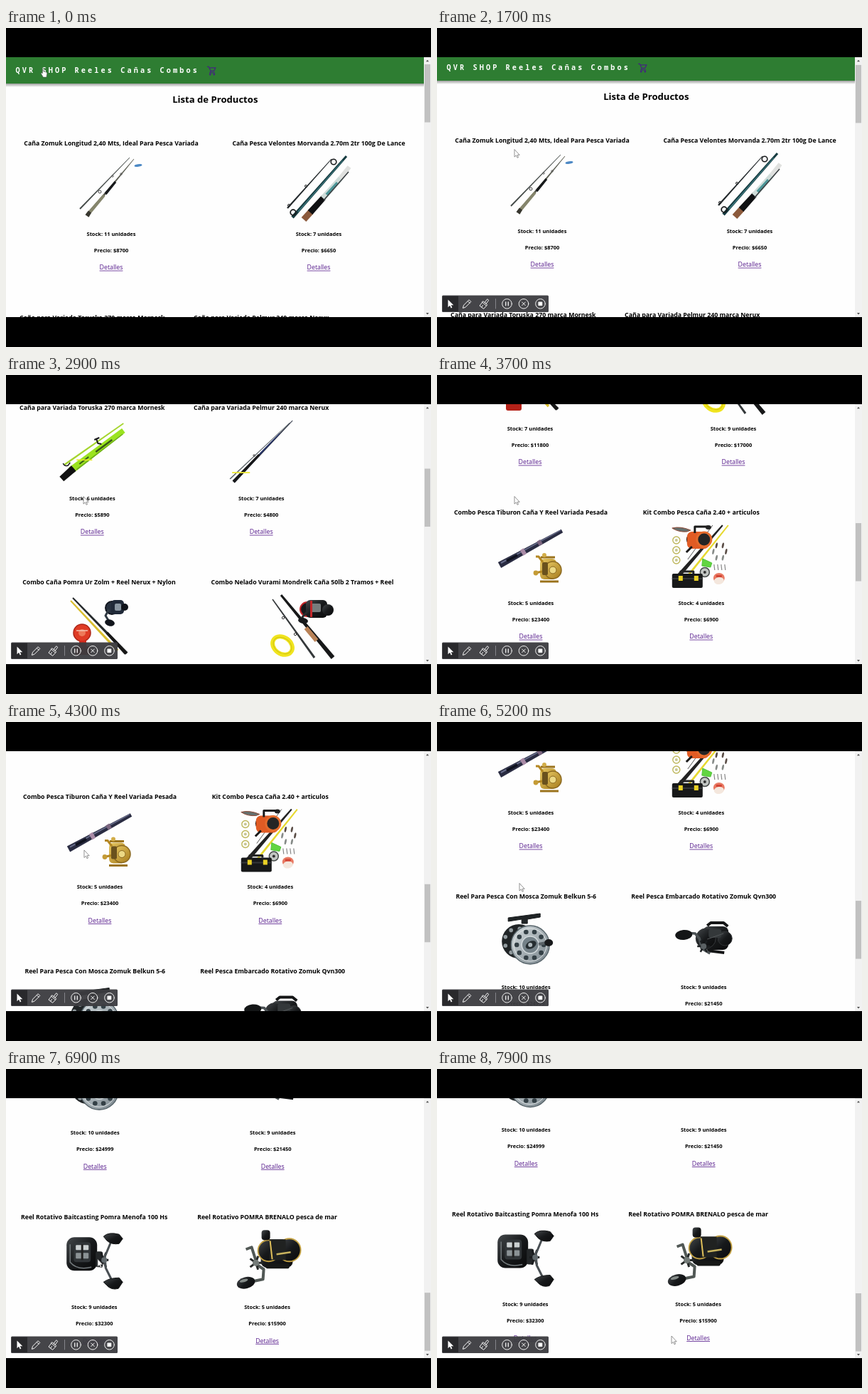
An HTML page that plays this animation: 598 px wide and 448 px high, repeating every 8 s.

```html
<!DOCTYPE html>
<html lang="es">
<head>
<meta charset="utf-8">
<title>Lista de Productos</title>
<style>
  html, body { margin: 0; width: 100%; height: 100%; overflow: hidden; background: #000; }
  svg { display: block; width: 598px; height: 448px; }
  text { font-family: "Open Sans", "Noto Sans", sans-serif; }
  .mid { text-anchor: middle; }
  .h1 { font-size: 13.1px; font-weight: 700; }
  .h3 { font-size: 8.75px; font-weight: 700; }
  .h4 { font-size: 7.45px; font-weight: 700; }
  .link { font-size: 8.8px; fill: #551a8b; }
  .nav { font: 700 10.2px "Noto Sans Mono", "DejaVu Sans Mono", monospace; letter-spacing: 3.12px; fill: #fff; white-space: pre; }
  .icon { fill: none; stroke: #f4f4f4; stroke-width: 1; stroke-linejoin: round; stroke-linecap: round; }
</style>
</head>
<body>
<svg viewBox="0 0 598 448">
  <defs>
    <clipPath id="view"><rect y="41" width="598" height="365"/></clipPath>
    <linearGradient id="shade" x2="0" y2="1">
      <stop stop-color="#000" stop-opacity=".38"/><stop offset="1" stop-color="#000" stop-opacity="0"/>
    </linearGradient>
    <linearGradient id="silver" x2="1" y2="1">
      <stop stop-color="#d5dcdf"/><stop offset="1" stop-color="#77838a"/>
    </linearGradient>
    <linearGradient id="gold" x2="1" y2="1">
      <stop stop-color="#e7c964"/><stop offset="1" stop-color="#a67b1c"/>
    </linearGradient>
    <linearGradient id="coal" x2="1" y2="1">
      <stop stop-color="#44484b"/><stop offset=".5" stop-color="#17191b"/><stop offset="1" stop-color="#0a0a0b"/>
    </linearGradient>
  </defs>
  <rect width="598" height="448"/>
  <g clip-path="url(#view)">
    <rect y="41" width="598" height="365" fill="#fefefe"/>
    <g id="page">
      <rect y="78" width="588" height="5" fill="url(#shade)"/>
      <rect y="30" width="588" height="48" fill="#2e7d32"/>
      <text class="nav" x="13.5" y="63">QVR SHOP Reeles Cañas Combos</text>
      <g fill="none" stroke="#43287c" stroke-width="1.3">
        <path d="M283 54.3h2.2l3 6.2h4.4l2.2-4.6h-9M288.2 60.5l-1.3 2.4h7.2"/>
        <circle cx="287.2" cy="65.2" r=".7"/><circle cx="292.8" cy="65.2" r=".7"/>
      </g>
      <text class="h1 mid" x="294.3" y="105">Lista de Productos</text>
      <g id="items"></g>
    </g>
    <rect x="588" y="41" width="10" height="365" fill="#f1f1f1"/>
    <rect id="thumb" x="589" y="51" width="8" height="81.5" fill="#c1c1c1"/>
    <path d="M591 47.2l2-2.4 2 2.4zM591 400l2 2.4 2-2.4z" fill="#505050"/>
  </g>
  <g id="tools">
    <rect x="7" y="375.5" width="150" height="23.5" rx="1.5" fill="#3b3c40" fill-opacity=".95"/>
    <rect x="8" y="376.5" width="22" height="21.5" fill="#29292c"/>
    <path d="M15.5 381.5v10.8l2.6-2.5 1.7 3.6 1.6-.8-1.7-3.4h3.6z" fill="#fff"/>
    <g class="icon">
      <path d="M36.5 393l1-3.7 7.6-7.6 2.7 2.7-7.6 7.6zM43.3 383.5l2.7 2.7"/>
      <path d="M70.5 381l-3.3 4.3 2.1 1.8 3.2-4.4zM65.2 384l5.4 4.6-1 1.7-6-5.2zM63.6 385.3l-3.6 4.8 5.6 4.3 3.8-4M62.7 392l1.8-2.5"/>
      <path d="M82.5 380.5v13.5" stroke="#85858a"/>
      <circle cx="98.5" cy="387.3" r="6.8"/><path d="M96.7 384.8v5M100.3 384.8v5" stroke-width="1.3"/>
      <circle cx="122" cy="387.3" r="6.8"/><path d="M119.7 385l4.6 4.6M124.3 385l-4.6 4.6"/>
      <circle cx="145.5" cy="387.3" r="6.8"/><path d="M143.2 385h4.6v4.6h-4.6z" fill="#fff"/>
    </g>
  </g>
  <g id="pointer">
    <path id="arrow" d="M0 0v10.6l2.4-2.3 1.6 3.5 1.6-.8-1.6-3.2h3.2z" fill="#fff" stroke="#666" stroke-width=".7"/>
    <path id="hand" d="M.2 0q1-.6 1.4.6v4l3.3.8q1.6.4 1.4 2.2l-.7 3.4v1.6H.8L-1.8 8q-1-1.6.4-1.6L0 7.2z" fill="#fff" stroke="#555" stroke-width=".6"/>
  </g>
</svg>
<script>
const $ = id => document.getElementById(id);

// Drawing helpers; each picture is an 88 by 88 box.
const path = (d, stroke, w = 1, fill = "none") =>
  `<path d="${d}" stroke="${stroke}" stroke-width="${w}" fill="${fill}" stroke-linejoin="round"/>`;
const line = (x1, y1, x2, y2, c, w = 1) => path(`M${x1} ${y1}L${x2} ${y2}`, c, w);
const disc = (x, y, r, fill, stroke = "none", w = 1) =>
  `<circle cx="${x}" cy="${y}" r="${r}" fill="${fill}" stroke="${stroke}" stroke-width="${w}"/>`;
const oval = (x, y, rx, ry, a, fill) =>
  `<ellipse rx="${rx}" ry="${ry}" fill="${fill}" transform="translate(${x} ${y}) rotate(${a})"/>`;
const box = (x, y, w, h, fill, r = 0) =>
  `<rect x="${x}" y="${y}" width="${w}" height="${h}" rx="${r}" fill="${fill}"/>`;
const ring = (n, f) => Array.from({ length: n }, (_, i) => {
  const a = i * 2 * Math.PI / n;
  return f(Math.cos(a), Math.sin(a));
}).join("");
// Tapered bar from w1 wide to w2 wide.
function rod(x1, y1, w1, x2, y2, w2, fill) {
  const l = Math.hypot(x2 - x1, y2 - y1) * 2, nx = (y1 - y2) / l, ny = (x2 - x1) / l;
  return `<path fill="${fill}" d="M${x1 + nx * w1} ${y1 + ny * w1}L${x2 + nx * w2} ${y2 + ny * w2}L${x2 - nx * w2} ${y2 - ny * w2}L${x1 - nx * w1} ${y1 - ny * w1}z"/>`;
}

const coal = "url(#coal)", silver = "url(#silver)", gold = "url(#gold)", ink = "#17191b";

const art = {
  slim: () => rod(0, 74, 2, 70, 2, .7, "#444a48") + rod(11, 82, 4, 76, 4, .7, "#5b5d52") +
    rod(11, 82, 5, 34, 55, 4, "#85856c") + rod(10, 84, 6, 14, 78, 5, "#38372f") +
    rod(36, 53, 3.6, 50, 36, 3.2, ink) + disc(28, 50, 2, "none", "#444") +
    disc(46, 28, 1.3, "none", "#555", .8) + disc(58, 25, 1.3, "none", "#555", .8) + oval(82, 13, 5.5, 1.8, -8, "#4c88c4"),
  trio: () => rod(0, 73, 2.5, 62, 4, 1, "#22282b") + rod(7, 86, 4.5, 83, 0, 3, "#173c41") +
    rod(15, 78, 1.3, 78, 6, 1, "#3f7f86") + rod(23, 89, 9, 33, 78, 9, "#8c5a3c") +
    rod(32, 79, 9, 51, 58, 8, "#101113") + rod(50, 59, 8, 75, 31, 7.5, "#cfdcd9") +
    rod(55, 54, 4, 70, 37, 3, "#4c9698") + rod(75, 31, 7.5, 87, 15, 6, "#e0e1df") +
    rod(51, 62, 1.6, 86, 22, 1.5, "#353a3d") + disc(8, 79, 3.8, "none", ink, 1.8) + disc(65, 8, 3.8, "none", ink, 1.6) +
    disc(26, 42, 1.5, "none", ink) + disc(2, 69, 1.5, "none", ink),
  lime: () => rod(5, 62, 2.6, 88, 4, 1.6, "#a5d52d") + rod(14, 70, 10, 88, 14, 7.5, "#9be320") +
    rod(22, 69, 2, 87, 19, 1.5, "#6fb01a") + rod(1, 82, 9, 18, 67, 10, "#111") +
    line(26, 61, 39, 51, "#37571a", 2) + line(49, 44, 72, 27, "#37571a", 2.6) +
    box(22, 54.5, 22, 1.6, "#e5e927") + path("M47 27l7-3M50 26l2 6 5 1", ink, 2) + path("M3 60q2 5 7 3l3-4", ink, 1.4),
  dark: () => rod(0, 82, 1.6, 84, 3, .7, "#555e63") + rod(5, 86, 4, 88, 0, 1, "#202738") +
    rod(5, 86, 4.5, 41, 48, 3.2, "#17181a") + rod(42, 47, 2, 70, 18, 1.4, "#2b376c") +
    box(3, 72.2, 25, 1.8, "#eee933") + disc(34, 49, 1.3, "none", "#444"),
  boat: () => rod(4, 8, 2, 70, 78, 3.5, "#d9bd2d") + rod(7, 4, 2, 83, 82, 4, "#24282a") +
    rod(55, 53, 4, 82, 82, 5, "#171717") + disc(62, 18, 9, "#27303e", "#12161f", 2) + box(61, 7, 18, 20, "#202938", 5) +
    box(66, 12, 9, 10, "#8995a0", 2) + disc(80, 17, 5, "#10131a") + path("M58 20l-5 9 5 8", "#303a43", 3) +
    oval(59, 39, 7, 4.5, 12, "#11151c") + box(10, 72, 22, 12, "#b42118", 3) + disc(20, 53, 12, "#df3c25", "#ad2518", 1.5) +
    disc(20, 53, 5, "#ed7959") + line(12, 50, 28, 50, "#f4c5b2", 1.5) + box(16, 64, 10, 9, "#d62b1d"),
  cork: () => rod(2, 6, 1.5, 61, 88, 3, "#34383a") + rod(14, 0, 3, 87, 88, 6, "#171819") +
    rod(49, 46, 6, 64, 64, 6, "#b98257") + ring(1, () => disc(17, 32, 1.7, "none", "#333") + disc(34, 55, 1.7, "none", "#333")) +
    disc(51, 20, 10, ink, "#c02427", 2) + box(49, 7, 30, 25, coal, 6) + box(56, 12, 14, 12, "#777c7d", 2) +
    box(55, 8, 3, 23, "#c3282b") + disc(80, 21, 8, coal) + path("M52 22l-8 9 1 6", "#292b2c", 3) + oval(45, 36, 7, 4, 8, ink) +
    `<g transform="rotate(35 16 71)"><ellipse cx="16" cy="71" rx="15" ry="11.5" fill="none" stroke="#f0e41e" stroke-width="6"/><ellipse cx="16" cy="71" rx="14" ry="10.5" fill="none" stroke="#cfc210"/></g>`,
  shark: () => rod(0, 56, 9, 88, 8, 5, "#2a2c42") + rod(2, 53, 2, 86, 7, 1.4, "#686d8b") +
    rod(31, 39, 9, 36, 36, 9, "#a98ba6") + rod(54, 26, 7, 59, 23, 7, "#7c6680") + rod(10, 50, 4, 25, 42, 4, "#10121f") +
    path("M58 45h20M57 79h26", "#9b731c", 3) + box(57, 47, 23, 29, gold, 6) + disc(75, 63, 12, gold, "#8b6920", 1.5) +
    disc(75, 63, 5, "#ecd985", "#8b6920") + box(60, 52, 8, 18, "#6a511d", 2) +
    path("M61 52l-6-8h-4M60 65l-10 2", "#b48723", 3) + disc(51, 67, 3.4, "#c49b36") + disc(63, 42, 3, "#d2ad49"),
  kit: () => rod(82, 0, 2, 18, 80, 3, "#e7d92f") + rod(74, 0, 2, 6, 78, 6, "#222") + line(60, 0, 25, 48, "#555") +
    [21, 35, 49].map(y => disc(9, y, 5, "none", "#bdb65a", 1.4) + disc(9, y, 2, "#c8c793")).join("") +
    path("M3 4q12-3 26 3l-5 2q-12 1-21-5", "#8f4b38", 1, "#65706e") + disc(31, 20, 8, "#191919") + box(24, 9, 31, 24, "#e05b24", 7) +
    disc(48, 20, 10, "#252525", "#e46b2c", 3) + path("M35 11V2h18M31 30l-8 8", "#1a1a1a", 3) + oval(54, 3, 4, 3, 0, "#222") +
    ring(6, (c, s) => oval(70 + 9 * c, 37 + 10 * s, 1.4, 4, 12, s > 0 ? "#858a87" : "#594c45")) +
    [62, 67, 72, 77].map(x => line(x, 55, x + 1, 63, "#858585", 1.2)).join("") +
    path("M46 47l13 6-2 6-12-2z", "#51c13a", 1, "#62d541") + disc(49, 66, 6.5, "#c2c6c3", "#454a48", 1.5) + disc(49, 66, 2, "#333") +
    oval(69, 74, 8, 7, 0, "#e87962") + oval(69, 78, 7, 5, -8, "#f4e7dd") + box(65, 70, 8, 3, "#d24434") +
    box(3, 68, 43, 20, "#171819", 2) + box(3, 74, 43, 2, "#34373a") + box(12, 71, 6, 7, "#ead125") + box(34, 71, 6, 7, "#ead125") +
    path("M15 68v-3h18v3", "#242424", 3),
  fly: () => disc(34, 45, 24, "#202426") + ring(9, (c, s) => disc(32 + 18 * c, 45 + 18 * s, 2.8, "#929b9f")) +
    path("M19 12L64 6v5L46 14v6h-8v-6l-19 3z", "#171a1c", 1, "#202426") +
    disc(50, 50, 27, silver, "#58656b", 1.4) + disc(50, 50, 23, "none", "#e2e7e8", 1) +
    ring(10, (c, s) => disc(50 + 19 * c, 50 + 19 * s, 3.3, "#344046")) +
    disc(50, 50, 12, "#748188", "#d3dadd", 1.5) + oval(51, 50, 8, 5, -28, "#252d31") + disc(50, 50, 3, "#aeb8bc") +
    rod(62, 49, 4, 73, 47, 4, "#596267") + oval(76, 47, 6, 5, 0, ink),
  drum: () => box(43, 24, 36, 33, coal, 8) + disc(47, 41, 14, coal, "#36393b", 1) + disc(74, 41, 10, coal, "#303234", 1) +
    box(51, 28, 18, 12, "#34383a", 3) + path("M49 23l5-4h18l6 5M49 58l24 3", "#141516", 4) +
    path("M16 33l16 1 6 7 3 14 12 7", "#4b5154", 3.6) + oval(16, 36, 12, 7, -5, "#141617") +
    ring(6, (c, s) => line(44, 52, 44 + 9 * c, 52 + 9 * s, "#1c1f21", 2.5)) + disc(44, 52, 4, "#5b6164") + line(49, 42, 72, 34, "#54585a"),
  bait: () => box(5, 11, 43, 47, coal, 11) + box(15, 18, 24, 28, "#313538", 4) + box(18, 22, 18, 7, "#cbd0d1", 1) +
    box(18, 33, 18, 8, "#8b9295", 1) + line(27, 21, 27, 43, "#222", 3) + path("M10 21v25q10 12 30 7", "#73797c", 1.5) +
    box(46, 31, 10, 22, "#242729", 3) + ring(6, (c, s) => line(57, 43, 57 + 7 * c, 43 + 12 * s, "#1a1c1e", 3)) +
    path("M69 14l-10 24 1 16 10 20", "#4a5054", 3) + disc(58, 43, 4, "#626a6e") +
    path("M57 10q7-7 22-3l5 6-5 7q-10 2-17-4z", "#161819", 1, coal) + path("M57 74q8-6 22-6l5 6-6 9q-10 3-17-5z", "#161819", 1, coal),
  sea: () => box(35, 14, 45, 40, coal, 9) + disc(46, 30, 15, coal, "#c3a143", 1.8) + disc(75, 29, 16, coal, "#c3a143", 1.8) +
    box(47, 14, 23, 29, "#202221") + line(48, 16, 51, 42, "#e0c05a", 2) + box(36, 1, 12, 14, coal, 4) + box(42, 48, 33, 7, "#171817", 2) +
    path("M57 35l20-3", "#c8b35e", 2.5) + path("M14 28l8-3 8 25 9 6-1 14-24 5", "#515855", 4) +
    ring(5, (c, s) => line(28, 47, 28 + 10 * c, 47 + 10 * s, "#252827", 3)) + disc(28, 47, 4.5, "#747b78") +
    oval(14, 75, 13, 8, -14, coal) + oval(11, 72, 6, 2, -14, "#858c89")
};

// centre, title, stock, price, picture
const items = [
  [148, "Caña Zomuk Longitud 2,40 Mts, Ideal Para Pesca Variada", 11, 8700, "slim"],
  [440, "Caña Pesca Velontes Morvanda 2.70m 2tr 100g De Lance", 7, 6650, "trio"],
  [121.3, "Caña para Variada Toruska 270 marca Mornesk", 6, 5890, "lime"],
  [359.2, "Caña para Variada Pelmur 240 marca Nerux", 7, 4800, "dark"],
  [131, "Combo Caña Pomra Ur Zolm + Reel Nerux + Nylon", 7, 11800, "boat"],
  [417, "Combo Nelado Vurami Mondrelk Caña 50lb 2 Tramos + Reel", 9, 17000, "cork"],
  [132, "Combo Pesca Tiburon Caña Y Reel Variada Pesada", 5, 23400, "shark"],
  [371.8, "Kit Combo Pesca Caña 2.40 + articulos", 4, 6900, "kit"],
  [125.2, "Reel Para Pesca Con Mosca Zomuk Belkun 5-6", 10, 24999, "fly"],
  [375.2, "Reel Pesca Embarcado Rotativo Zomuk Qvn300", 9, 21450, "drum"],
  [124.2, "Reel Rotativo Baitcasting Pomra Menofa 100 Hs", 9, 32300, "bait"],
  [367.6, "Reel Rotativo POMRA BRENALO pesca de mar", 5, 15900, "sea"]
];

$("items").innerHTML = items.map(([cx, title, stock, price, pic], i) => {
  const y = 162 + 245 * (i >> 1);
  const label = (cls, dy, s) => `<text class="${cls} mid" x="${cx}" y="${y + dy}">${s}</text>`;
  return label("h3", 3.4, title) +
    `<g transform="translate(${cx - 44} ${y + 18})">${art[pic]()}</g>` +
    label("h4", 129.8, `Stock: ${stock} unidades`) +
    label("h4", 152.7, `Precio: $${price}`) +
    label("link", 177.3, "Detalles") +
    box(cx - 16.4, y + 178.6, 32.8, .8, "#551a8b");
}).join("");

// Monotone cubic through [time, value] pairs.
function track(keys) {
  const n = keys.length - 1;
  const rate = i => (keys[i + 1][1] - keys[i][1]) / (keys[i + 1][0] - keys[i][0]);
  const slope = keys.map((_, i) => {
    if (!i || i === n) return 0;
    const a = rate(i - 1), b = rate(i);
    return a * b > 0 ? 2 * a * b / (a + b) : 0;
  });
  return t => {
    if (t <= keys[0][0]) return keys[0][1];
    if (t >= keys[n][0]) return keys[n][1];
    const i = keys.findIndex(k => k[0] > t) - 1;
    const [t0, a] = keys[i], [t1, b] = keys[i + 1], h = t1 - t0, u = (t - t0) / h, v = 1 - u;
    return a * v * v * (1 + 2 * u) + b * u * u * (3 - 2 * u) + h * u * v * (slope[i] * v - slope[i + 1] * u);
  };
}

const scroll = track([[1600, 0], [1700, 4], [2900, 361], [3700, 704], [5200, 897], [6000, 1051], [6100, 1051], [6400, 1104.5], [7000, 1183.5]]);
const px = track([[900, 51.5], [1400, 109], [3900, 109], [5200, 116], [6400, 129], [7300, 129], [7900, 330]]);
const py = track([[900, 56.5], [1400, 170.5], [3900, 170.5], [5200, 226.5], [6400, 267], [7300, 267], [7900, 375]]);
const tools = track([[0, 0], [300, 1]]);

const LOOP = 8000, STEP = 100, start = performance.now();
function draw() {
  const t = Math.floor((performance.now() - start) % LOOP / STEP) * STEP;
  const s = scroll(t), y = py(t);
  $("page").setAttribute("transform", `translate(0 ${-s})`);
  $("thumb").setAttribute("y", 51 + s / 1183.5 * 264);
  $("pointer").setAttribute("transform", `translate(${px(t)} ${y})`);
  $("hand").style.display = y < 68 ? "" : "none";
  $("arrow").style.display = y < 68 ? "none" : "";
  $("tools").style.opacity = tools(t);
  requestAnimationFrame(draw);
}
draw();
</script>
</body>
</html>
```
